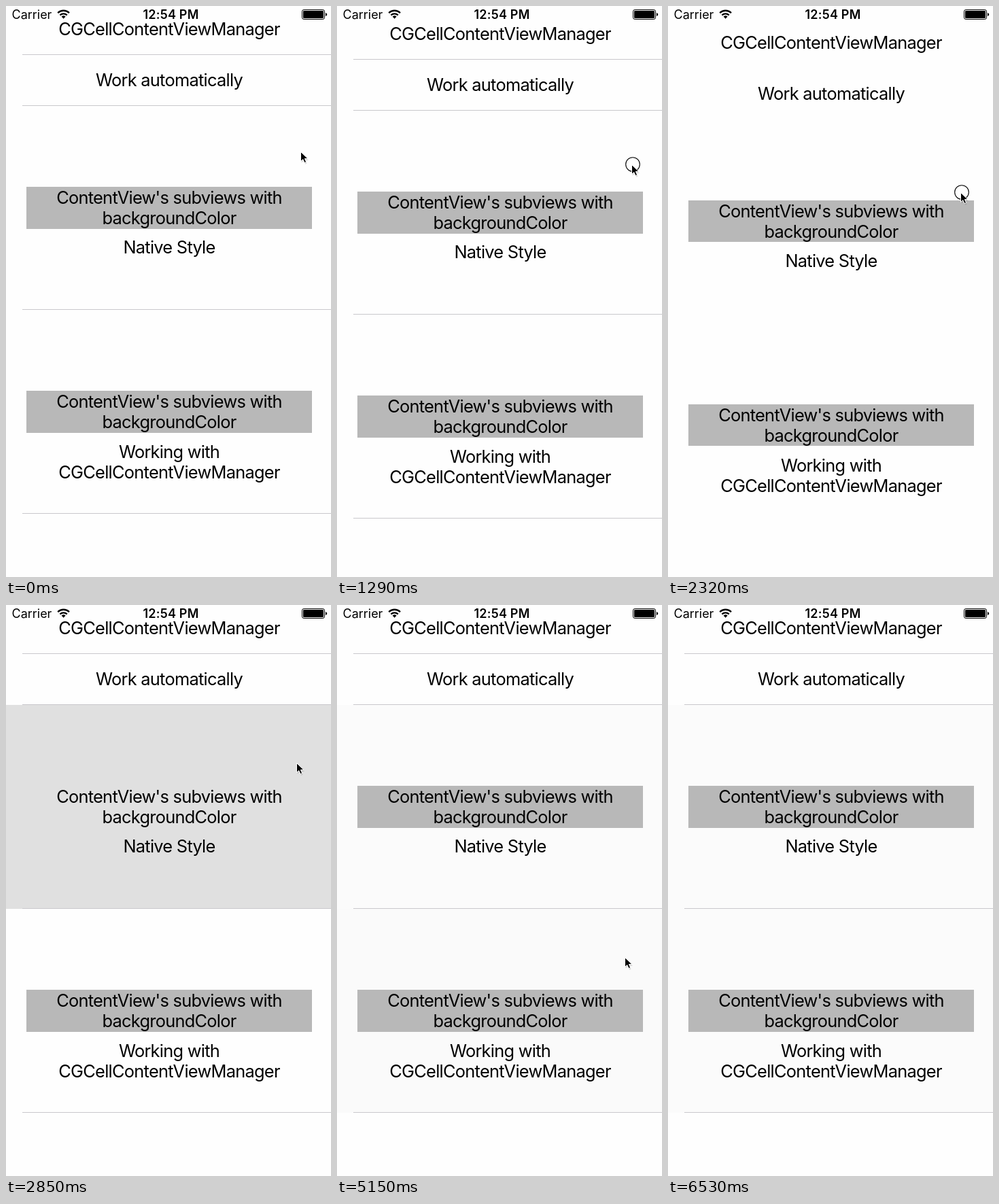
An HTML page that plays this animation: 478 px wide and 840 px high, repeating every 6860 ms.

```html
<!DOCTYPE html>
<html lang="en">
<head>
<meta charset="utf-8">
<title>Cell content view demo</title>
<style>
  html, body { margin: 0; width: 100%; height: 100%; overflow: hidden; background: #fefefe; }
  svg { display: block; width: 478px; height: 840px; }
  text { font-family: Inter, Roboto, sans-serif; fill: #000; }
  #list text { font-size: 25.4px; letter-spacing: -0.73px; text-anchor: middle; }
  #list rect { shape-rendering: crispEdges; }
  .status { font-size: 18px; }
  .clock { font-weight: 600; letter-spacing: 0.2px; text-anchor: middle; }
  .cell { fill: #e0e0e0; opacity: 0; }
  .label { fill: #b8b8b8; }
  .line { fill: #c9c8cc; }
</style>
</head>
<body>
<svg viewBox="0 0 478 840">
  <rect width="478" height="840" fill="#fefefe"/>
  <g id="list"></g>

  <text class="status" x="8.5" y="19">Carrier</text>
  <g fill="none" stroke="#000" stroke-width="2.3">
    <path d="M76.2 10.2a12 12 0 0 1 16.8 0"/>
    <path d="M79.4 13.5a7.4 7.4 0 0 1 10.4 0"/>
  </g>
  <path d="M81.6 15.6a4.3 4.3 0 0 1 6 0l-3 3.2z"/>
  <text class="status clock" x="242.5" y="19">12:54 PM</text>
  <rect x="435.5" y="5.5" width="33" height="14" rx="2.6" fill="none" stroke="#000"/>
  <rect x="437" y="7" width="30" height="11" rx="1.2"/>
  <path d="M470 10q2.2 .6 2.2 2.5t-2.2 2.5z"/>

  <g id="pointer">
    <circle id="touch" cx="2" cy="0" r="10.3" fill="none" stroke="#000" stroke-width="1.1"/>
    <path d="M1.5 2.5v14l3.3-2.8 2.3 5 2.5-1-2.2-4.8h4.6z" fill="#000" opacity=".13"/>
    <path d="M.5 .5v14l3.3-2.9 2.2 5 2.6-1.1-2.2-4.9h4.6z" stroke="#fff" stroke-width="1"/>
  </g>
</svg>

<script>
const LOOP = 6860;
const $ = id => document.getElementById(id);
const list = $('list');

function add(tag, attrs, content = '') {
  const el = document.createElementNS('http://www.w3.org/2000/svg', tag);
  for (const key in attrs) el.setAttribute(key, attrs[key]);
  el.textContent = content;
  list.append(el);
  return el;
}
const box = (cls, x, y, width, height) => add('rect', { class: cls, x, y, width, height });
const write = (y, content) => add('text', { x: 240, y }, content);

const tops = [147, 447];
const cells = tops.map(y => box('cell', 0, y, 478, 300));
const lines = [71, 146, 446, 746].map(y => box('line', 24, y, 454, 1));
const labels = tops.map(y => box('label', 30, y + 119, 420, 61.5));

write(43, 'CGCellContentViewManager');
write(118, 'Work automatically');
for (const y of tops) {
  write(y + 144, "ContentView's subviews with");
  write(y + 174, 'backgroundColor');
}
write(364, 'Native Style');
write(665, 'Working with');
write(695, 'CGCellContentViewManager');

const drags = [
  { from: 650, to: 1410, pull: 31.7 },
  { from: 1910, to: 2680, pull: 20 }
];
const taps = [
  { cell: 0, on: 2680, fade: 3750 },
  { cell: 1, on: 4530, fade: 4860 },
  { cell: 1, on: 5560, fade: 5800 }
];
const HOLD = 170;     // how long a tap stays pressed
const FADE = 340;
const CLEARED = 580;  // how long the native label loses its colour
const TINT = 0.1;     // what a fade leaves behind

// where the pointer rests between drags
const stops = [
  { t: 0, x: 433, y: 214 },
  { t: 1910, x: 433, y: 216 },
  { t: 2680, x: 427, y: 232 },
  { t: 3020, x: 427, y: 232 },
  { t: 3700, x: 411, y: 362 },
  { t: 4160, x: 404, y: 503 },
  { t: 5150, x: 423, y: 518 },
  { t: 6200, x: 416, y: 598 },
  { t: 6530, x: 447, y: 814 }
];

const clamp = v => Math.min(1, Math.max(0, v));
const within = (t, from, to) => t >= from && t < to;

// each drag pulls the list down and lets it spring back
const scroll = t => drags.reduce((sum, { from, to, pull }) =>
  sum + pull * Math.sin(Math.PI * clamp((t - from) / (to - from))) ** 2, 0);

function rest(t) {
  const i = Math.max(1, stops.findIndex(stop => stop.t > t));
  const a = stops[i - 1], b = stops[i];
  const p = clamp((t - a.t) / (b.t - a.t));
  return { x: a.x + (b.x - a.x) * p, y: a.y + (b.y - a.y) * p };
}

function highlight(cell, t) {
  const tap = taps.filter(item => item.cell === cell && t >= item.on).pop();
  if (!tap) return 0;
  const p = clamp((t - tap.fade) / FADE);
  return 1 - (1 - TINT) * p * p * (3 - 2 * p);
}

function draw(t) {
  const offset = scroll(t);
  list.setAttribute('transform', `translate(0 ${offset})`);
  // hairlines drop out between whole pixels
  lines.forEach(line => line.style.opacity = offset % 1 < 0.5 ? 1 : 0);
  cells.forEach((cell, i) => cell.style.opacity = highlight(i, t));
  const { on, fade } = taps[0];
  const cleared = [on, fade].some(from => within(t, from, from + CLEARED));
  labels[0].style.opacity = cleared ? 0 : 1;

  const { x, y } = rest(t);
  const tipY = Math.round(y + 2.5 * offset);
  $('pointer').setAttribute('transform', `translate(${Math.round(x)} ${tipY})`);
  $('pointer').style.opacity = t < 6530 ? 1 : 0;
  const pressed = drags.some(d => within(t, d.from, d.to)) ||
    taps.some(tap => within(t, tap.on, tap.on + HOLD));
  $('touch').style.opacity = pressed ? 1 : 0;
}

const start = performance.now();
function tick() {
  draw((performance.now() - start) % LOOP);
  requestAnimationFrame(tick);
}
draw(0);
requestAnimationFrame(tick);
</script>
</body>
</html>
```
